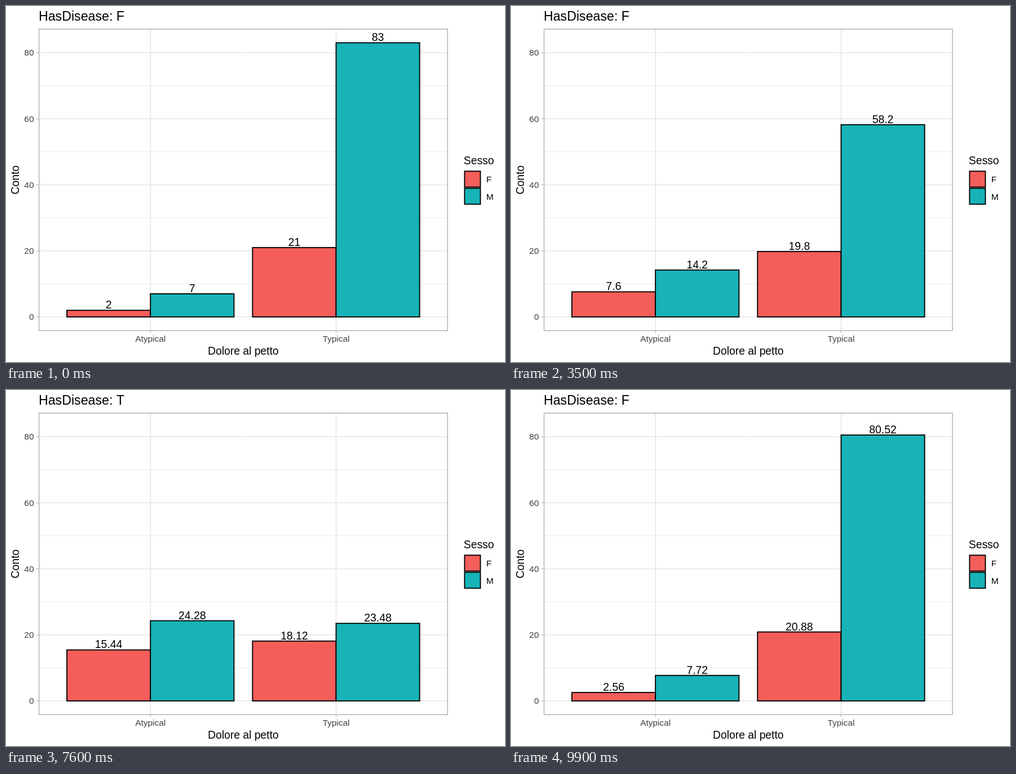
An HTML page with a canvas for the animation above (10000 ms loop, 885x632 px).

```html
<!DOCTYPE html>
<html lang="it">
<head>
<meta charset="utf-8">
<style>
  html, body { margin: 0; width: 100%; height: 100%; overflow: hidden; background: #fff; }
  canvas { display: block; }
</style>
</head>
<body>
<canvas id="chart" width="885" height="632"></canvas>
<script>
const ctx = document.getElementById('chart').getContext('2d');
const FONT = '"Liberation Sans", Arial, sans-serif';
const RED = '#f35e5a', TEAL = '#17b3b7', GRID = '#d7d7d7', FRAME = '#a8a8a8', TICK_TEXT = '#404040';
const PANEL = { left: 58.6, right: 783, top: 41, bottom: 576.3 };
const BASE = 19.31, SMALL = 15.45;
const LOOP = 10000, STEP = 100, HOLD_STEPS = 25, MOVE_STEPS = 25;

// Counts in the order Atypical F, Atypical M, Typical F, Typical M.
const HEALTHY = [2, 7, 21, 83], SICK = [16, 25, 18, 21];

const toX = v => PANEL.left + (v - 0.4) / 2.2 * (PANEL.right - PANEL.left);
const toY = v => PANEL.bottom - (v + 4.15) / 91.3 * (PANEL.bottom - PANEL.top);

function line(x1, y1, x2, y2, color, width) {
  ctx.strokeStyle = color;
  ctx.lineWidth = width;
  ctx.beginPath();
  ctx.moveTo(x1, y1);
  ctx.lineTo(x2, y2);
  ctx.stroke();
}

function box(x1, y1, x2, y2, fill) {
  ctx.fillStyle = fill;
  ctx.strokeStyle = '#000';
  ctx.lineWidth = 1.87;
  ctx.fillRect(x1, y1, x2 - x1, y2 - y1);
  ctx.strokeRect(x1, y1, x2 - x1, y2 - y1);
}

function text(str, x, y, size, align = 'left', color = '#000') {
  ctx.font = `${size}px ${FONT}`;
  ctx.textAlign = align;
  ctx.fillStyle = color;
  ctx.fillText(str, x, y);
}

function drawAxes() {
  const { left, right, top, bottom } = PANEL;
  for (let v = 10; v < 80; v += 20) line(left, toY(v), right, toY(v), GRID, 0.5);
  for (let v = 0; v <= 80; v += 20) {
    line(left, toY(v), right, toY(v), GRID, 0.94);
    line(left - 4.8, toY(v), left, toY(v), FRAME, 0.94);
    text(v, 49.5, toY(v) + 5.5, SMALL, 'right', TICK_TEXT);
  }
  ['Atypical', 'Typical'].forEach((name, i) => {
    const x = toX(i + 1);
    line(x, top, x, bottom, GRID, 0.94);
    line(x, bottom, x, bottom + 4.8, FRAME, 0.94);
    text(name, x, 596.4, SMALL, 'center', TICK_TEXT);
  });
  text('Dolore al petto', (left + right) / 2, 618.6, BASE, 'center');
  ctx.save();
  ctx.translate(23.4, (top + bottom) / 2);
  ctx.rotate(-Math.PI / 2);
  text('Conto', 0, 0, BASE, 'center');
  ctx.restore();
}

function drawLegend() {
  text('Sesso', 811.8, 281, BASE);
  [['F', RED], ['M', TEAL]].forEach(([name, color], i) => {
    const y = 293.3 + i * 30.3;
    box(813.3, y, 841.4, y + 28.2, color);
    text(name, 851.8, y + 20.1, SMALL);
  });
}

function drawBars(progress) {
  const bars = HEALTHY.map((count, i) => ({
    value: count + (SICK[i] - count) * progress,
    x: 0.55 + (i >> 1) + (i % 2) * 0.45,
    color: i % 2 ? TEAL : RED
  }));
  for (const { value, x, color } of bars) box(toX(x), toY(value), toX(x + 0.45), toY(0), color);
  for (const { value, x } of bars)
    text(+value.toFixed(2), toX(x + 0.225), toY(value) - 3, 19.4, 'center');
}

function render(now) {
  const step = Math.floor(now % LOOP / STEP);
  const cycle = HOLD_STEPS + MOVE_STEPS;
  const moved = Math.max(0, step % cycle - HOLD_STEPS) / MOVE_STEPS;
  const progress = step < cycle ? moved : 1 - moved;

  ctx.fillStyle = '#fff';
  ctx.fillRect(0, 0, 885, 632);
  drawAxes();
  drawBars(progress);
  ctx.strokeStyle = FRAME;
  ctx.lineWidth = 1.3;
  ctx.strokeRect(PANEL.left, PANEL.top, PANEL.right - PANEL.left, PANEL.bottom - PANEL.top);
  drawLegend();
  text('HasDisease: ' + (progress > 0.5 ? 'T' : 'F'), 58, 26.3, 23.18);
}

const start = performance.now();
function loop() {
  render(performance.now() - start);
  requestAnimationFrame(loop);
}
loop();
</script>
</body>
</html>
```
